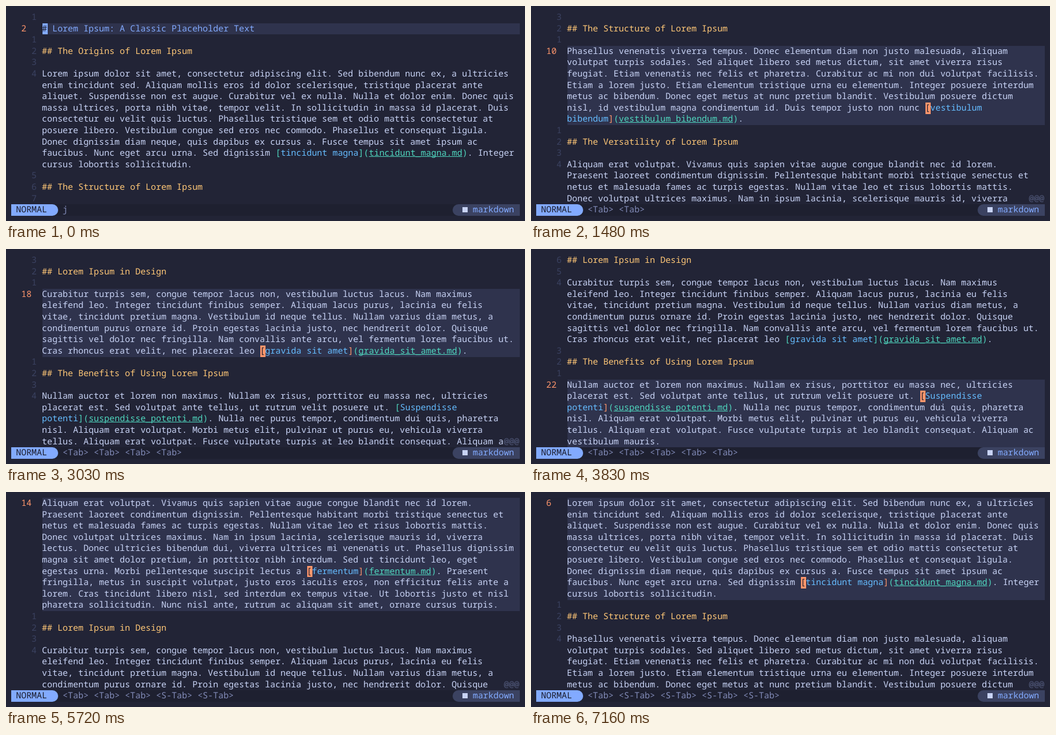
These frames come from a looping animation (896x372 px, 8 s). An HTML page:

```html
<!DOCTYPE html>
<html lang="en">
<head>
<meta charset="utf-8">
<title>Markdown link navigation</title>
<style>
html, body { margin: 0; width: 100%; height: 100%; overflow: hidden; background: #222436; }
body {
  position: relative;
  font: 14.933px/20px "Noto Sans Mono", "DejaVu Sans Mono", monospace;
  font-variant-ligatures: none;
  text-rendering: geometricPrecision;
  color: #c8d3f5;
}
.screen { position: absolute; inset: 0; opacity: 0; }
.screen div, .screen span { position: absolute; white-space: pre; }
.line { background: #2f334d; }
.bar { background: #1e2030; }
.mode { background: #82aaff; border-radius: 0 10px 10px 0; }
.type { background: #3b4261; border-radius: 10px 0 0 10px; }
.icon { background: #c8d3f5; }
.block { background: #ff966c; }
.block.plain { background: #82aaff; }
.dark { color: #1b1d2b; }
.num { color: #3b4261; }
.now, .match { color: #ff966c; }
.title, .lang { color: #82aaff; }
.head { color: #ffc777; }
.link { color: #65bcff; }
.mark, .url { color: #4fd6be; }
.url {
  text-decoration: underline 1px;
  text-underline-offset: 1px;
  text-decoration-skip-ink: none;
}
.more { color: #545c7e; }
.keys { color: #828bb8; }
</style>
</head>
<body>
<script>
const CELL = 8.96, ROW = 19.6, TOP = 10.2, ROWS = 17, TEXT_COL = 7, LOOP = 8000;
const MORE_COL = 96, KEY_ROOM = 37;

const lines = `
# Lorem Ipsum: A Classic Placeholder Text

## The Origins of Lorem Ipsum

Lorem ipsum dolor sit amet, consectetur adipiscing elit. Sed bibendum nunc ex, a ultricies|
enim tincidunt sed. Aliquam mollis eros id dolor scelerisque, tristique placerat ante|
aliquet. Suspendisse non est augue. Curabitur vel ex nulla. Nulla et dolor enim. Donec quis|
massa ultrices, porta nibh vitae, tempor velit. In sollicitudin in massa id placerat. Duis|
consectetur eu velit quis luctus. Phasellus tristique sem et odio mattis consectetur at|
posuere libero. Vestibulum congue sed eros nec commodo. Phasellus et consequat ligula.|
Donec dignissim diam neque, quis dapibus ex cursus a. Fusce tempus sit amet ipsum ac|
faucibus. Nunc eget arcu urna. Sed dignissim [tincidunt magna](tincidunt_magna.md). Integer|
cursus lobortis sollicitudin.

## The Structure of Lorem Ipsum

Phasellus venenatis viverra tempus. Donec elementum diam non justo malesuada, aliquam|
volutpat turpis sodales. Sed aliquet libero sed metus dictum, sit amet viverra risus|
feugiat. Etiam venenatis nec felis et pharetra. Curabitur ac mi non dui volutpat facilisis.|
Etiam a lorem justo. Etiam elementum tristique urna eu elementum. Integer posuere interdum|
metus ac bibendum. Donec eget metus at nunc pretium blandit. Vestibulum posuere dictum|
nisl, id vestibulum magna condimentum id. Duis tempor justo non nunc [vestibulum|
bibendum](vestibulum_bibendum.md).

## The Versatility of Lorem Ipsum

Aliquam erat volutpat. Vivamus quis sapien vitae augue congue blandit nec id lorem.|
Praesent laoreet condimentum dignissim. Pellentesque habitant morbi tristique senectus et|
netus et malesuada fames ac turpis egestas. Nullam vitae leo et risus lobortis mattis.|
Donec volutpat ultrices maximus. Nam in ipsum lacinia, scelerisque mauris id, viverra|
lectus. Donec ultricies bibendum dui, viverra ultrices mi venenatis ut. Phasellus dignissim|
magna sit amet dolor pretium, in porttitor nibh interdum. Sed ut tincidunt leo, eget|
egestas urna. Morbi pellentesque suscipit lectus a [fermentum](fermentum.md). Praesent|
fringilla, metus in suscipit volutpat, justo eros iaculis eros, non efficitur felis ante a|
lorem. Cras tincidunt libero nisl, sed interdum ex tempus vitae. Ut lobortis justo et nisl|
pharetra sollicitudin. Nunc nisl ante, rutrum ac aliquam sit amet, ornare cursus turpis.

## Lorem Ipsum in Design

Curabitur turpis sem, congue tempor lacus non, vestibulum luctus lacus. Nam maximus|
eleifend leo. Integer tincidunt finibus semper. Aliquam lacus purus, lacinia eu felis|
vitae, tincidunt pretium magna. Vestibulum id neque tellus. Nullam varius diam metus, a|
condimentum purus ornare id. Proin egestas lacinia justo, nec hendrerit dolor. Quisque|
sagittis vel dolor nec fringilla. Nam convallis ante arcu, vel fermentum lorem faucibus ut.|
Cras rhoncus erat velit, nec placerat leo [gravida sit amet](gravida_sit_amet.md).

## The Benefits of Using Lorem Ipsum

Nullam auctor et lorem non maximus. Nullam ex risus, porttitor eu massa nec, ultricies|
placerat est. Sed volutpat ante tellus, ut rutrum velit posuere ut. [Suspendisse|
potenti](suspendisse_potenti.md). Nulla nec purus tempor, condimentum dui quis, pharetra|
nisl. Aliquam erat volutpat. Morbi metus elit, pulvinar ut purus eu, vehicula viverra|
tellus. Aliquam erat volutpat. Fusce vulputate turpis at leo blandit consequat. Aliquam ac|
vestibulum mauris.`.replace(/\|\n/g, "|").split("\n");

// start time, first visible line, cursor line, key pressed
const steps = [
  [0, 1, 2, "j"],
  [500, 1, 6, "<Tab>"],
  [1480, 7, 10, "<Tab>"],
  [2280, 11, 14, "<Tab>"],
  [3030, 15, 18, "<Tab>"],
  [3830, 16, 22, "<Tab>"],
  [4940, 16, 18, "<S-Tab>"],
  [5720, 14, 14, "<S-Tab>"],
  [6440, 10, 10, "<S-Tab>"],
  [7160, 6, 6, "<S-Tab>"]
];

function box(parent, cls, col, row, cols, rows = 1) {
  const el = document.createElement("div");
  const y = Math.round(TOP + row * ROW);
  el.className = cls;
  el.style.left = col * CELL + "px";
  el.style.top = y + "px";
  el.style.width = cols * CELL + "px";
  el.style.height = Math.round(TOP + (row + rows) * ROW) - y + "px";
  parent.append(el);
  return el;
}

function put(parent, cls, col, row, text) {
  const el = document.createElement("span");
  el.className = cls;
  el.style.left = col * CELL - 0.7 + "px";
  el.style.top = Math.round(TOP + row * ROW - 1.2) + "px";
  el.textContent = text;
  parent.append(el);
}

function tokens(line, active) {
  if (line.startsWith("##")) return [["head", line]];
  if (line.startsWith("#")) {
    return active ? [["cursor plain", "#"], ["title", line.slice(1)]] : [["title", line]];
  }
  const m = line.match(/^(.*)\[(.+)\]\((.+)\)(.*)$/);
  if (!m) return [["", line]];
  return [
    ["", m[1]], [active ? "cursor" : "mark", "["], ["link", m[2]],
    [active ? "match" : "mark", "]"], ["mark", "("], ["url", m[3]],
    ["mark", ")"], ["", m[4]]
  ];
}

function drawLine(screen, line, start, active) {
  let row = start, col = 0;
  const cut = start + line.split("|").length > ROWS;
  for (const [cls, text] of tokens(line, active)) {
    text.split("|").forEach((part, i) => {
      if (i) { row++; col = 0; }
      if (row >= ROWS || !part) return;
      const x = TEXT_COL + col;
      const shown = cut && row === ROWS - 1 ? part.slice(0, Math.max(0, MORE_COL - x)) : part;
      if (cls.startsWith("cursor")) {
        box(screen, cls.replace("cursor", "block"), x, row, 1);
        put(screen, "dark", x, row, shown);
      } else {
        put(screen, cls, x, row, shown);
      }
      col += part.length;
    });
  }
  if (cut) put(screen, "more", MORE_COL, ROWS - 1, "@@@");
}

function drawStatus(screen, keys) {
  box(screen, "bar", 1, ROWS, 98);
  box(screen, "mode", 1, ROWS, 9);
  put(screen, "dark", 2, ROWS, "NORMAL");
  put(screen, "keys", 11, ROWS, keys.join(" "));
  box(screen, "type", 86, ROWS, 13);
  const icon = box(screen, "icon", 88, ROWS, 1);
  icon.style.top = "348px";
  icon.style.height = "9px";
  put(screen, "lang", 90, ROWS, "markdown");
}

function drawScreen([, first, cursor], keys) {
  const screen = document.createElement("div");
  screen.className = "screen";
  let row = 0;
  for (let n = first; n <= lines.length && row < ROWS; n++) {
    const line = lines[n - 1], height = line.split("|").length, active = n === cursor;
    if (active) {
      box(screen, "line", TEXT_COL, row, 92, Math.min(height, ROWS - row));
      put(screen, "now", 3, row, String(n));
    } else {
      put(screen, "num", 3, row, String(Math.abs(n - cursor)).padStart(3));
    }
    drawLine(screen, line, row, active);
    row += height;
  }
  drawStatus(screen, keys);
  document.body.append(screen);
  return screen;
}

let keys = [];
steps.forEach((step, i) => {
  const start = step[0], end = i + 1 < steps.length ? steps[i + 1][0] : LOOP;
  if (i === 1) keys = [];
  keys.push(step[3]);
  while (keys.join(" ").length > KEY_ROOM) keys.shift();
  const frame = (opacity, time) => ({ opacity, offset: time / LOOP, easing: "step-end" });
  const frames = [frame(1, start), frame(0, end)];
  if (start > 0) frames.unshift(frame(0, 0));
  if (end < LOOP) frames.push(frame(0, LOOP));
  drawScreen(step, keys).animate(frames, { duration: LOOP, iterations: Infinity, fill: "both" });
});
</script>
</body>
</html>
```
